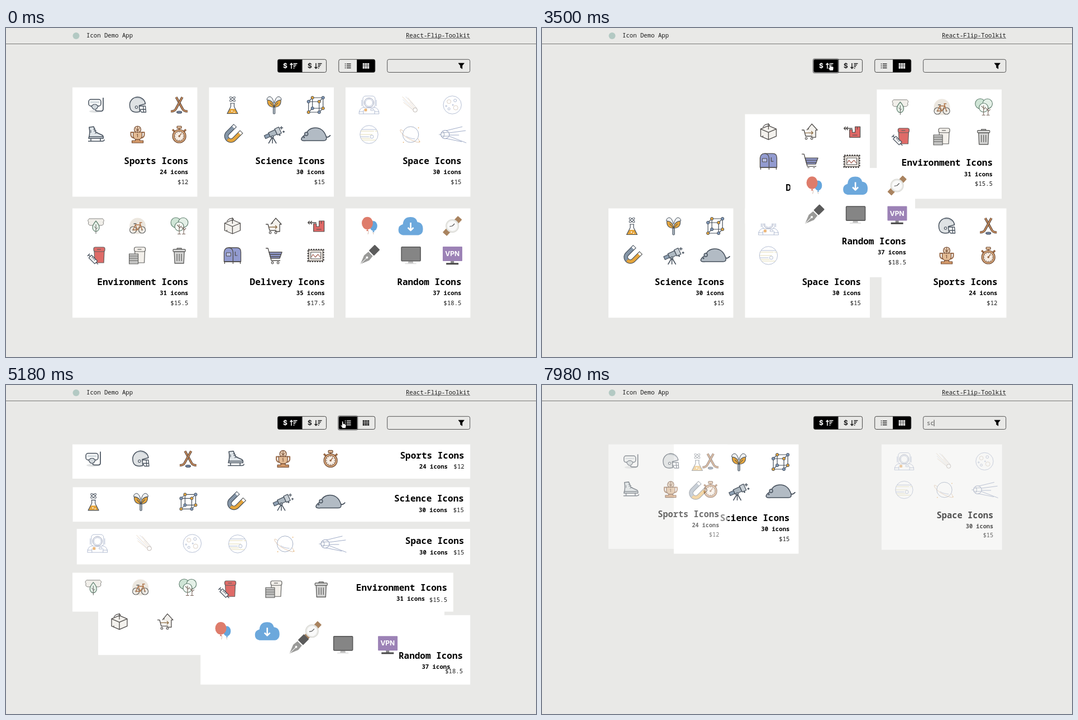
Animation of 949x590 px, one loop 8000 ms. Source, as an HTML page:

```html
<!DOCTYPE html>
<html lang="en">
<head>
<meta charset="utf-8">
<title>Icon Demo App</title>
<style>
html, body { margin: 0; width: 100%; height: 100%; overflow: hidden; background: #e9e9e7; }
svg { display: block; width: 949px; height: 590px; }
text { font: 10.67px "Noto Sans Mono", "DejaVu Sans Mono", monospace; fill: #1c1c1c; }
.title { font-size: 16px; font-weight: 700; fill: #000; }
.count { font-weight: 700; fill: #000; }
.end { text-anchor: end; }
.icon { stroke-linejoin: round; }
</style>
</head>
<body>
<svg id="stage" viewBox="0 0 949 590"></svg>
<script>
const LOOP = 8000, STEP = 70;
const ink = '#46505c', amber = '#e5a53c', brown = '#9a6a47', steel = '#aeb9c2';

// Shape helpers
const paint = (f, s, w) => `fill="${f}" stroke="${s}" stroke-width="${w}"`;
const P = (d, f = 'none', s = ink, w = 1.2) => `<path d="${d}" ${paint(f, s, w)}/>`;
const E = (x, y, rx, ry, f = 'none', s = ink, w = 1.2) =>
  `<ellipse cx="${x}" cy="${y}" rx="${rx}" ry="${ry}" ${paint(f, s, w)}/>`;
const C = (x, y, r, f, s, w) => E(x, y, r, r, f, s, w);
const R = (x, y, w, h, f = 'none', s = ink, sw = 1.2, r = 0) =>
  `<rect x="${x}" y="${y}" width="${w}" height="${h}" rx="${r}" ${paint(f, s, sw)}/>`;
const G = (tr, ...parts) => `<g transform="${tr}">${parts.join('')}</g>`;
const mirror = s => s + G('scale(-1 1)', s);

function lattice() {
  const at = (i, j, k) => [-13 + i * 19 + k * 7, 13 - j * 19 - k * 7];
  let lines = '', balls = '';
  for (let n = 0; n < 8; n++) {
    const v = [n & 1, n >> 1 & 1, n >> 2];
    const a = at(...v);
    v.forEach((bit, axis) => {
      if (bit) return;
      const u = v.slice();
      u[axis] = 1;
      lines += `M${a}L${at(...u)}`;
    });
    balls += C(a[0], a[1], 2.6, (v[0] + v[1] + v[2]) % 2 ? '#7f97b8' : amber, ink, 1);
  }
  return P(lines) + balls;
}

function stopwatch() {
  let ticks = '';
  for (let i = 0; i < 12; i++) {
    const a = i * Math.PI / 6, x = Math.cos(a), y = Math.sin(a);
    ticks += `M${x * 6.5} ${3 + y * 6.5}L${x * 8.5} ${3 + y * 8.5}`;
  }
  return R(-4, -15, 8, 4, '#e3bd98', '#6d4a34', 1.2, 1) + P('M-12 -9L-8 -5M12 -9L8 -5', 'none', brown, 3.4) + P('M0 -11V-8', 'none', brown, 3) +
    C(0, 3, 12, '#dca97b', '#6d4a34') + C(0, 3, 9, '#f8eee4', '#6d4a34', 1) + P(ticks, 'none', '#6d4a34', .8) +
    P('M0 3L4 -2', 'none', brown, 1.4) + C(0, 3, 1.2, brown, brown);
}

const shaft = 'M-5.5 -14L6 7Q8 11.5 15 11.5';
const stick = P(shaft, 'none', '#5a4a40', 4.2) + P(shaft, 'none', '#c98b5b', 2);
const sports = [
  E(0, 11.5, 12, 2.5, '#e1e3e4', 'none') + R(-13, -10, 22, 12, '#f4f6f7', ink, 1.5, 4) +
    P('M-8 2Q-6 8 -2 8T4 2L0 -1H-4Z', '#d3d9dd') + P('M-10 -5H6', 'none', steel) +
    P('M13 -13V7Q13 11 9 11H2Q0 11 -1 9', 'none', ink, 1.7),
  P('M-14 2A14 14 0 1 1 14 -2L3 1 4 12Q-13 16 -14 2Z', '#dfe2e4', ink, 1.5) +
    P('M3 2H14L15 13H7L4 8M10 2L11 13M5 8H15', 'none', ink, 1.3) + C(-2, 4, 2.2, '#fff') + P('M-6 -12Q3 -14 10 -8', 'none', steel),
  mirror(stick) + E(0, 13, 4.5, 2, '#7182a0'),
  P('M-12 -13L-4 -14 0 -4 11 1Q14 3 13 7H-13Q-10 -2 -12 -13Z', '#e0e6ea', ink, 1.6) +
    P('M-14 12H11Q15 12 15 9M-9 7V12M8 7V12M-13 4H12', 'none', ink, 1.5) + P('M-5 -9L-1 -10M-4 -6L1 -7M-2 -2L3 -4M-9 -8V-3', 'none', ink, 1),
  P('M-7 -4H-12V1Q-11 6 -6 6M7 -4H12V1Q11 6 6 6', 'none', brown, 2) + C(0, -9, 6, '#ecd2b8', '#744b32') +
    P('M-8 -4H8V3Q7 9 0 9T-8 3Z', '#e3bb94', '#744b32') + P('M-4 9H4V11H10V15H-10V11H-4Z', '#d59b6b', '#744b32') +
    P('M-4 -11L3 -6M4 -11L-3 -6M0 -15V-3M0 -1V5M-1.5 0.5L0 -1', 'none', '#744b32', 1),
  stopwatch()
];

const orbit = E(0, 0, 6, 2.2, 'none', ink, 1);
const spark = (x, y, r) => P(`M${x - r} ${y}H${x + r}M${x} ${y - r}V${y + r}`, 'none', ink, 1.3);
const science = [
  G('translate(0 -10.5)', G('rotate(40)', orbit), G('rotate(-40)', orbit)) +
    P('M-5.5 7L-9.5 15.5H9.5L5.5 7Z', amber, 'none') + P('M-4 -3H4M-3 -3V3L-9.5 15.5H9.5L3 3V-3') +
    C(-1, 11, 1.2, '#fff', 'none') + C(3, 13, 1, '#fff', 'none'),
  R(-1.7, 3, 3.4, 13, steel, ink, 1, 1) + P('M0 -3Q-3 -15 -8 -15Q-13 -14 -13 -9M0 -3Q3 -15 8 -15Q13 -14 13 -9', '#eef0f1', ink, 1) +
    mirror(P('M0 4Q-13 4 -12 -9Q-1 -8 0 4L-7 -4', amber, ink, 1.1)),
  lattice(),
  G('rotate(45)', P('M-8 -15V4A8 8 0 0 0 8 4V-15', 'none', ink, 7.8), P('M-8 -14V4A8 8 0 0 0 0 12', 'none', '#8596a8', 5.4),
    P('M0 12A8 8 0 0 0 8 4V-14', 'none', amber, 5.4), P('M-8 -14V-10M8 -14V-10', 'none', '#fff', 5.4)),
  G('translate(-2 -2) rotate(-25)', R(-16, -3, 9, 6, '#8ea0b3'), R(-7, -4.5, 13, 9, steel), R(6, -6, 8, 12, '#c9d0d6')) +
    P('M-3 4L-10 16M-3 4L4 16M-3 4V16', 'none', ink, 1.5) + C(-3, 4, 2, steel) + spark(13, -12, 3) + spark(17, -5, 2) + spark(10, 1, 1.5),
  P('M17 3Q20 6 23 4T26 1', 'none', ink, 1.8) +
    P('M-26 8Q-24 3 -18 0Q-13 -12 -1 -12Q14 -12 19 5Q20 11 14 11H-18Q-26 12 -26 8Z', '#b2bbc4', ink, 1.5) +
    C(-17, -1, 3, '#b2bbc4', ink, 1.4) + C(-21, 5, .8, ink, ink)
];

const pale = '#8d9cbd', thin = (d, s = pale) => P(d, 'none', s, .65);
const ring = (x, y, r, s = pale) => C(x, y, r, 'none', s, .65);
const space = [
  R(-11, -16, 22, 21, 'none', pale, .65, 5) + ring(0, -4, 8.5, '#626f91') + ring(0, -4, 6.5) +
    thin('M-8 4Q-18 5 -18 16H18Q18 5 8 4M-10 9V16M10 9V16M-18 12H-10M10 12H18M-13 -9V2M13 -9V2') +
    R(-8, 7, 4, 4, '#f2bc7c', '#d99b58', .6) + R(3, 7, 5, 3, 'none', pale, .6),
  ring(8, 9, 3.8, '#9b8e86') + thin('M-15 -15L5 6M-5 -13L10 5M-13 -5L4 9M-2 -5L7 5', '#dcc5aa') + thin('M-9 -15L11 6M-14 -10L4 8', '#c4c9d4'),
  ring(0, 0, 16.2) + ring(-6, -6, 3.5, '#c7b7a4') + ring(5, -8, 2.5) + ring(6, 5, 4, '#c7b7a4') + ring(-6, 7, 2) + ring(-11, 2, 1.2) + ring(1, 0, 1),
  ring(0, 0, 16.2) + thin('M-15 -6H9M-16 0H6M-12 10H12M-14 7H2M11 -6H15', '#d6cb8f') + thin('M-13 -9H13M-15 4H0') + ring(5, 4, 3),
  ring(0, 0, 14.2, '#7184a6') + thin('M-13 -6Q-21 -12 -18 -5Q-11 6 9 13Q20 17 13 7', '#d3aa85') + thin('M-8 3Q-3 7 8 8') +
    [[14, -12], [-13, 14], [16, 13]].map(([x, y]) => C(x, y, .9, '#e9b777', 'none')).join(''),
  C(-13, 0, 7.5, 'none', '#7180a6', .8) + thin('M-20 -3L-7 -4M-20 3L-7 3M-17 -6Q-12 0 -17 6M-24 0H-20', '#6f7f9f') +
    P('M-11 -7L18 -14M-6 -3L24 -7M-6 3L25 15M-12 7L17 13M-6 1H12', 'none', '#8796b9', .8)
];

const moss = '#5d7d6c', soot = '#626260';
const bin = (x, y, f) => P(`M${x + 1} ${y + 7}H${x + 19}L${x + 18} ${y + 28}H${x + 2}Z`, f, soot) + R(x, y, 20, 8, f, soot, 1.2, 3) + P(`M${x + 6} ${y + 4}H${x + 13}`, 'none', soot);
const wheel = x => C(x, 7, 6, 'none', soot, 1.2) + C(x, 7, 1, soot, soot, .5);
const tree = (x, y) => P(`M${x} 14V${y}M${x} ${y + 5}l-4 -4M${x} ${y + 7}l4 -4M${x - 3} 14.5h6`, 'none', '#79665c', 1.1);
const environment = [
  P('M-12 -13H12Q16 -10 13 -7Q15 -2 10 -1H-10Q-15 -2 -13 -7Q-16 -10 -12 -13Z', '#f1efea', '#858481', 1) +
    P('M0 -9Q-7 -1 -6 4Q-5 9 0 10Q5 9 6 4Q7 -1 0 -9Z', '#e6f1e8', moss) + P('M0 -3V14M0 4L-3 1M0 6L3 3', 'none', soot, 1),
  C(0, 0, 14.5, '#ece7df', 'none') + wheel(-8) + wheel(8) + P('M-8 7L-4 -2H5L0 7H-8M-4 -2L0 7M8 7L4 -6H8', 'none', '#ae7448', 1.4) + P('M-7 -4H-2', 'none', soot, 1.6),
  C(-6, -6, 9, '#cfe5d6', moss, 1.1) + C(7, -6, 8.8, '#e4f0e7', moss, 1.1) + C(0, 1, 8, '#f4f8f4', moss, 1.1) + tree(0, -3) + tree(8, 1),
  bin(-4, -15, '#df6b68') + G('translate(-6 6) rotate(45)', P('M-10 -3V3M-10 0H-6M9 0H14', 'none', ink, 1.3), R(-6, -3.5, 15, 7, '#f5f5f5', ink), P('M-2 -3V0M1 -3V0M4 -3V0', 'none', ink, 1)),
  bin(-6, -15, '#f3f0eb') + R(-15, -3, 16, 18, '#c4c4c3', soot) + P('M-15 1H1M-15 5H1M-15 9H1', 'none', soot, 1),
  P('M-9 -7H9L8 14H-8Z', '#d4d4d3', soot, 1.4) + R(-11, -11, 22, 4, '#e7e7e6', soot, 1.3, 1) + P('M-4 -11V-13H4V-11M-4 -3V10M0 -3V10M4 -3V10', 'none', soot, 1.3)
];

const line = '#4f4c4a', blue = '#929bd0', red = '#e06866';
const cart = (x, y) => C(x, y, 1.8, '#fff', line) + C(x + 10, y, 1.8, '#fff', line);
const delivery = [
  P('M-14 -5L0 -11 14 -5V8L0 14 -14 8Z', '#f3f1ed', line, 1.3) + P('M-14 -5L0 1 14 -5M0 1V14M-10 7V9', 'none', line, 1.3) + P('M-10 -8Q-5 -16 2 -12M2 -12L-1 -15M2 -12L-1 -9M0 -11V-4', 'none', line, 1.2),
  P('M-6 -3L3 -14 13 -3H10V10H2M-3 -4V-6', '#f3f1ed', line, 1.3) + P('M-15 -3H-11L-8 8H4', 'none', line, 1.4) + cart(-7, 12) + P('M-9 2H5M2 -1L5 2 2 5', 'none', '#8b6b42', 1.3),
  P('M-4 -4H1V1H6V-9H15V10H-4Z', red, line, 1.2) + P('M-14 -6H1M-11 -9L-14 -6 -11 -3M-7 -9L-10 -6 -7 -3', 'none', line, 1.4) + P('M10 -9V-4M1 6H10', 'none', line, 1),
  P('M-15 11V-6Q-14 -14 -7 -14H8Q15 -14 15 -6V11Z', blue, line, 1.3) + P('M1 11V-6Q0 -14 -7 -14M-14 11V15M1 11V15M14 11V15M-15 11H15', 'none', line, 1.3) + R(-11, -5, 8, 6, '#b9bfe3', line, 1) + P('M5 -7V0H9', 'none', line, 1.2),
  P('M-9 -6H14L10 5H-6Z', blue, line, 1.3) + P('M-15 -13H-11L-5 9H11M-7 -2H12M-6 2H11', 'none', line, 1.3) + cart(-3, 13),
  `<rect x="-13.5" y="-10.5" width="27" height="21" fill="#f5eee7" stroke="${line}" stroke-width="3.2" stroke-dasharray="2.4 2"/>` +
    R(-12.5, -9.5, 25, 19, '#f5eee7', line, 1) + R(-9, -6, 18, 12, '#fff', line, 1.1) + P('M-8 3L-5 -2 -1 3 4 -2 8 3', 'none', '#a35f51', 1.2)
];

const random = [
  P('M-2 7Q0 11 -2 15M8 9Q7 12 8 15', 'none', '#c6a999', .8) + E(8, 0, 6.8, 9, '#64a5dc', 'none') + P('M6 11L8 8 10 11Z', '#64a5dc', 'none') +
    E(-3, -5, 10, 11.3, '#de7c6b', 'none') + P('M-5 9L-3 5 -1 9Z', '#de7c6b', 'none'),
  P('M-14 16.5Q-22 15 -22 7Q-22 -1 -14 -3Q-13 -16 0 -16Q10 -16 12 -7Q22 -6 22 6Q22 15 14 16.5Z', '#6ca8dc', 'none') + P('M0 -6V8M-5 3L0 8 5 3', 'none', '#fff', 2.6),
  G('rotate(43)', R(-5, -20, 10, 40, '#a9835f', 'none', 0, 1), C(0, 0, 11.5, '#e8e8e4', '#d7d7d3', 1), C(0, 0, 9, '#fafafa', 'none')) + P('M-5 1L0 0 4 -4', 'none', '#555', 1.2),
  G('rotate(45)', R(-6.5, -21, 13, 15, '#5b5b5b', 'none', 0, 1), P('M-5.5 -4H5.5L6.5 6 0 22 -6.5 6Z', '#9a9a98', 'none'), P('M0 6V21', 'none', '#fff', 1), C(0, 5, 2, '#fff', 'none')),
  P('M-4 10H4L5 14H-5Z', '#bdbdbd', 'none') + P('M-10 14.5H10', 'none', '#dedede', 1.6) + R(-16.5, -15.3, 34, 25, '#858585', '#5a5a5a', 1.6, 1),
  P('M-3 8H3V14H-3Z', '#888', 'none') + P('M-11 14.8H11', 'none', '#474747', 3) + R(-17.2, -16, 35, 26, '#9c82b6', 'none', 0, 1) +
    '<text y="1.2" text-anchor="middle" style="font:700 12px Inter,Roboto,sans-serif;fill:#fff">VPN</text>'
];

// Stage furniture
const stage = document.getElementById('stage');
const add = (html, parent = stage) => {
  const g = document.createElementNS('http://www.w3.org/2000/svg', 'g');
  g.innerHTML = html;
  return parent.appendChild(g);
};
add(C(125.5, 14, 6, '#b3c9c3', 'none') + '<text x="144" y="17">Icon Demo App</text>' +
  '<text x="831" y="17" class="end">React-Flip-Toolkit</text>' + P('M716 18.5H831', 'none', '#444', .8) + P('M0 28.5H949', 'none', '#777', 1));

const half = (x, w, left) => left
  ? `M${x + w} 56.3H${x + 3}Q${x} 56.3 ${x} 59.3V76.5Q${x} 79.5 ${x + 3} 79.5H${x + w}Z`
  : `M${x} 56.3H${x + w - 3}Q${x + w} 56.3 ${x + w} 59.3V76.5Q${x + w} 79.5 ${x + w - 3} 79.5H${x}Z`;
const sortMark = (x, up) =>
  `<text x="${x - 11}" y="72" style="font:700 12px Inter,Roboto,sans-serif;fill:currentColor">$</text>` +
  G(`translate(${x + 4} 68)`, P(up ? 'M0 5V-4M-2.4 -2L0 -4.6 2.4 -2' : 'M0 -5V4M-2.4 2L0 4.6 2.4 2', 'none', 'currentColor', 1.5)) +
  P(`M${x + 7.5} 63.7h7M${x + 7.5} 66.5h5.2M${x + 7.5} 69.3h3.6M${x + 7.5} 72.1h2`, 'none', 'currentColor', 1.4);
let cells = '';
for (let i = 0; i < 9; i++) cells += `M${638.7 + i % 3 * 4.1} ${63.3 + (i / 3 | 0) * 3.4}h3.4v2.7h-3.4z`;
const marks = [
  sortMark(507, true), sortMark(551, false),
  P('M606.8 64.5h1.6M606.8 68h1.6M606.8 71.5h1.6M610 64.5h7.6M610 68h7.6M610 71.5h7.6', 'none', 'currentColor', 1.4),
  P(cells, 'currentColor', 'none')
];
const buttons = [[486.4, 43.6, 1], [530, 43.6, 0], [595.8, 32.7, 1], [628.5, 32.3, 0]].map(([x, w, left], i) => {
  const g = add(P(half(x, w, left), 'none', '#333', .9) + marks[i]);
  const halo = add(R(x - 1, 55.3, w + 2, 25.2, 'none', '#8d8d8d', 1.8, 3));
  return { g, face: g.firstChild, halo };
});
add(R(682.7, 56.3, 148, 23.2, 'none', '#444', .9, 3) + P('M810 63H820.5L816.9 67.6V73.2L813.6 71V67.6Z', '#000', '#000', .6));
const inputHalo = add(R(682, 55.5, 149.5, 24.8, 'none', '#777', 2.2, 4));
const typed = add('<text x="689" y="72" style="fill:#555"></text>').firstChild;
const caret = add(P('M0 62.5V74', 'none', '#444', 1));

// Cards
const layer = add('');
const cards = [
  ['Sports', 24, 12, sports], ['Science', 30, 15, science], ['Space', 30, 15, space],
  ['Environment', 31, 15.5, environment], ['Delivery', 35, 17.5, delivery], ['Random', 37, 18.5, random]
].map(([name, count, price, art]) => {
  const g = add(R(0, 0, 0, 0, '#fff', 'none') + art.map(a => `<g class="icon">${a}</g>`).join('') +
    `<text class="title end">${name} Icons</text><text class="count end">${count} icons</text><text class="end">$${price}</text>`, layer);
  return { g, box: g.firstChild, icons: [...g.querySelectorAll('.icon')], texts: [...g.children].slice(-3), gap: 21 + 6.4 * `$${price}`.length };
});

const up = [0, 1, 2, 3, 4, 5], down = [5, 4, 3, 1, 2, 0], found = [1, 0, 2, 3, 4, 5];
const every = n => up.map(i => i * n);
// Delays follow the order on screen before the change
const phases = [
  { at: -1e6, order: up, delays: every(0) },
  { at: 1690, order: down, delays: every(82) },
  { at: 3348, order: up, delays: [0, 91, 138, 215, 295, 375] },
  { at: 4660, order: up, list: true, delays: every(80) },
  { at: 5736, order: up, delays: [0, 89, 161, 202, 279, 359] },
  { at: 7862, order: found, delays: every(0) }
];
const exits = [7878, Infinity, 7895, 7230, 7250, 7270];

// Spring with stiffness 200 and damping 26
function spring(ms) {
  if (ms <= 0) return 0;
  const t = ms / 1000, w = Math.sqrt(31);
  return 1 - Math.exp(-13 * t) * (Math.cos(w * t) + 13 / w * Math.sin(w * t));
}
const mix = (a, b, p) => a + (b - a) * p;

function layout(id, { order, list }) {
  const n = order.indexOf(id), gap = cards[id].gap;
  const box = list ? [119, 106.5 + 77 * n, 712, 61.5] : [119 + n % 3 * 244.5, 106.5 + (n / 3 | 0) * 217, 223.5, 196];
  const spots = up.flatMap(i => list ? [37 + 85 * i, 26] : [42 + i % 3 * 74.6, 31.5 + (i / 3 | 0) * 53]);
  const text = list ? [10.5, 25.5, gap, 44, 10.5, 44] : [16, 137, 16, 155.5, 16, 173];
  return [...box, ...spots, ...text];
}

function drawCard(id, k, t) {
  const { g, box, icons, texts } = cards[id];
  const now = phases[k], old = phases[Math.max(0, k - 1)];
  // Cards on their way out stay where they were
  const stays = now.order === found && id !== 1;
  const p = stays ? 0 : spring(t - now.at - now.delays[old.order.indexOf(id)]);
  const to = layout(id, now);
  const v = layout(id, old).map((a, i) => mix(a, to[i], p));
  const out = spring(t - exits[id]);
  g.setAttribute('transform', `translate(${v[0]} ${v[1]}) scale(${1 - .1 * out})`);
  g.setAttribute('opacity', Math.max(0, 1 - out));
  box.setAttribute('width', v[2]);
  box.setAttribute('height', v[3]);
  icons.forEach((el, i) => el.setAttribute('transform', `translate(${v[4 + 2 * i]} ${v[5 + 2 * i]})`));
  texts.forEach((el, i) => {
    el.setAttribute('x', v[2] - v[16 + 2 * i]);
    el.setAttribute('y', v[17 + 2 * i]);
  });
}

// Pointer: time, x, y
const path = [[1050, 548, 104], [1500, 556, 70], [2700, 556, 70], [3150, 517, 70], [3800, 517, 70], [4450, 604, 71],
  [5200, 604, 71], [5600, 644, 75], [6150, 644, 75], [6600, 692.5, 70.5], [7200, 692.5, 70.5]];
const shapes = {
  arrow: P('M-3 -6V5L-.5 3 1.5 7 3 6 1.5 2H5Z', '#000', '#fff', .8),
  hand: P('M-2.5 -5.5Q-1 -7 0 -5V-1.5Q1 -2.5 2 -1Q3 -2 3.6 -.5Q5 -1 5 .5V3Q5 5 3.5 6.5H-1.5L-4.8 1.5Q-4.5 0 -2.5 1.5Z', '#fff', '#111', 1),
  beam: P('M-2 -5.5Q0 -5.5 0 -4.5Q0 -5.5 2 -5.5M0 -4.5V4.5M-2 5.5Q0 5.5 0 4.5Q0 5.5 2 5.5', 'none', '#333', 1)
};
const pointer = add('');

function drawPointer(t) {
  const i = path.findIndex(q => q[0] > t);
  if (i < 1) { pointer.innerHTML = ''; return; }
  const [a, b] = [path[i - 1], path[i]];
  const u = (t - a[0]) / (b[0] - a[0]), e = u * u * (3 - 2 * u);
  const x = mix(a[1], b[1], e), y = mix(a[2], b[2], e);
  const free = y > 80 || x > 661 || (x > 574 && x < 595);
  pointer.innerHTML = shapes[x > 682 ? 'beam' : free ? 'arrow' : 'hand'];
  pointer.setAttribute('transform', `translate(${x} ${y})`);
}

// Clicks: time, focused control (4 is the filter field)
const clicks = [[1640, 1], [3300, 0], [4580, 2], [5690, 3], [6650, 4], [7850, -1]];
const show = (el, on) => el.setAttribute('visibility', on ? 'visible' : 'hidden');

function drawControls(t) {
  const past = clicks.filter(c => c[0] <= t);
  const focus = past.length ? past[past.length - 1][1] : -1;
  const active = [0, 3];
  past.forEach(([, n]) => { if (n >= 0 && n < 4) active[n >> 1] = n; });
  buttons.forEach(({ g, face, halo }, i) => {
    const on = active.includes(i);
    face.setAttribute('fill', on ? '#000' : 'none');
    g.style.color = on ? '#fff' : '#222';
    show(halo, focus === i);
  });
  show(inputHalo, focus === 4);
  const word = t >= 7850 ? 'sc' : t >= 7200 ? 's' : '';
  typed.textContent = word;
  caret.setAttribute('transform', `translate(${689.3 + 6.4 * word.length} 0)`);
  show(caret, t >= 6650);
}

let stacked = -1;
function draw(t) {
  let k = phases.length - 1;
  while (phases[k].at > t) k--;
  if (k !== stacked) {
    phases[k].order.forEach(id => layer.appendChild(cards[id].g));
    stacked = k;
  }
  up.forEach(id => drawCard(id, k, t));
  drawControls(t);
  drawPointer(t);
}

const start = performance.now();
function tick() {
  const t = (performance.now() - start) % LOOP;
  draw(Math.floor((t + 2) / STEP) * STEP);
  requestAnimationFrame(tick);
}
tick();
</script>
</body>
</html>
```
